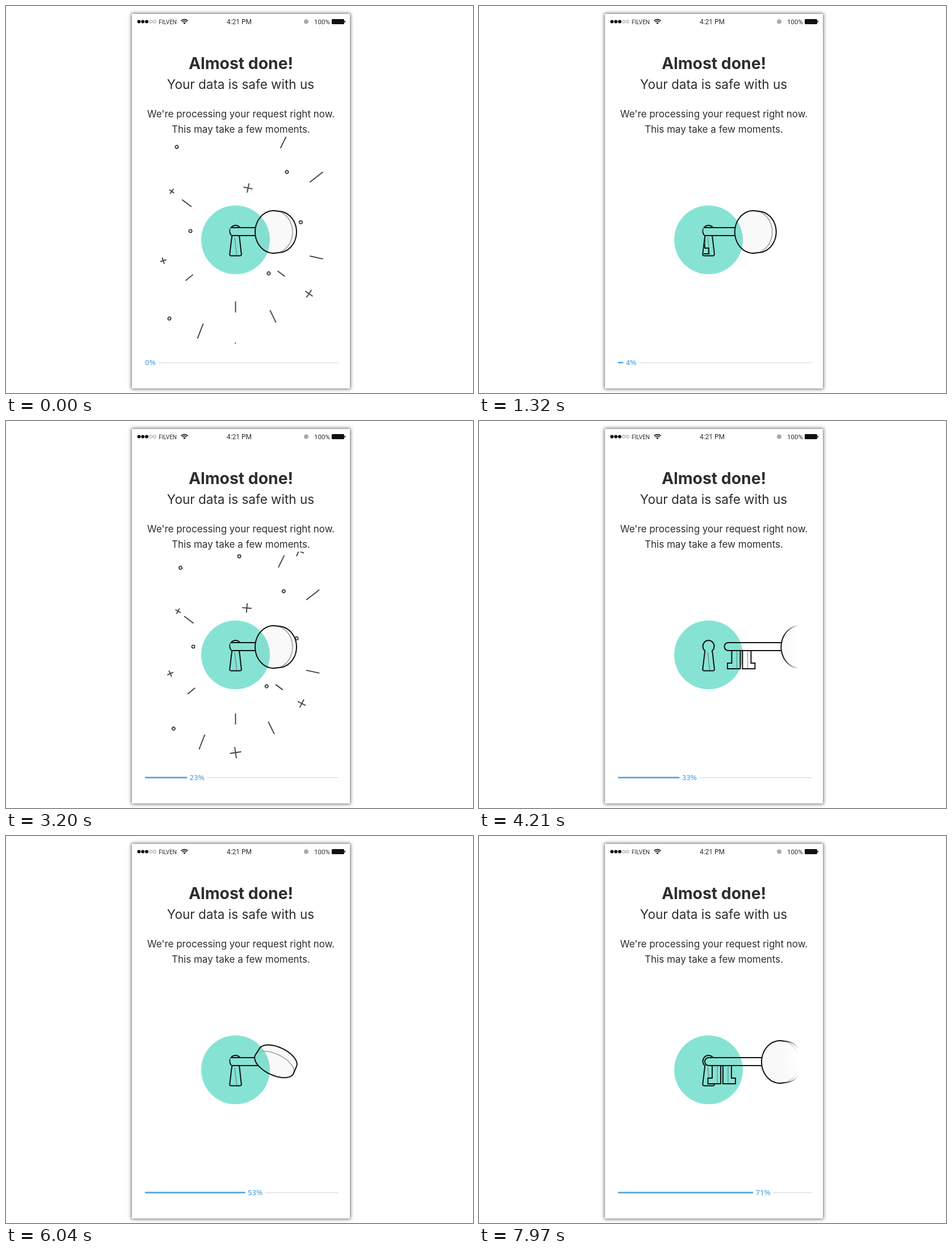
Animation, 823 px wide and 681 px high, one loop 8 s. Source, as an HTML page with a canvas:

```html
<!DOCTYPE html>
<html lang="en">
<head>
<meta charset="utf-8">
<title>Almost done</title>
<style>
  html, body { margin: 0; width: 823px; height: 681px; overflow: hidden; background: #fff; }
  .card { position: absolute; left: 222px; top: 14px; width: 384px; height: 659px; background: #fff; box-shadow: 0 0 6px 1px rgba(0, 0, 0, .6); }
  svg, canvas { position: absolute; left: 0; top: 0; }
  text { font-family: Inter, sans-serif; fill: #2d2d2d; }
  .mid { text-anchor: middle; }
  .status { font-family: Roboto, sans-serif; }
  #percent { font: 600 13px "Open Sans", sans-serif; fill: #62aee0; }
</style>
</head>
<body>
<div class="card"></div>
<svg width="823" height="681">
  <g fill="#111">
    <circle cx="234.3" cy="27.5" r="3"/><circle cx="241.1" cy="27.5" r="3"/><circle cx="247.9" cy="27.5" r="3"/>
    <g fill="none" stroke="#777" stroke-width=".8"><circle cx="254.9" cy="27.5" r="2.6"/><circle cx="261.7" cy="27.5" r="2.6"/></g>
    <path d="M314.5 32 l-2.2 -2.2 a3.1 3.1 0 0 1 4.4 0z"/>
    <path d="M310.6 28.1 a5.5 5.5 0 0 1 7.8 0 M308.6 26.1 a8.4 8.4 0 0 1 11.8 0" fill="none" stroke="#111" stroke-width="1.7"/>
    <rect x="574" y="23" width="22" height="9" rx="1.5"/><rect x="596.5" y="26" width="1.5" height="3"/>
  </g>
  <circle cx="529" cy="27.5" r="4" fill="#aaa"/>
  <text class="status" x="269" y="31.5" font-size="10">FILVEN</text>
  <text class="status mid" x="411" y="32" font-size="12">4:21 PM</text>
  <text class="status" x="543" y="32" font-size="11.5">100%</text>
  <text class="mid" x="414" y="111" font-size="28.3" font-weight="700">Almost done!</text>
  <text class="mid" x="413.5" y="146" font-size="22.5">Your data is safe with us</text>
  <text class="mid" x="414" y="196" font-size="17">We're processing your request right now.</text>
  <text class="mid" x="414" y="223" font-size="17">This may take a few moments.</text>
  <rect id="track" y="627" height="1.3" fill="#dadcde"/>
  <rect id="bar" x="245" y="626" height="3" fill="#62aee0"/>
  <text id="percent" y="632"></text>
</svg>
<canvas id="stage" width="823" height="681"></canvas>
<script>
const ctx = document.getElementById('stage').getContext('2d');
const track = document.getElementById('track');
const bar = document.getElementById('bar');
const percent = document.getElementById('percent');

const LOOP = 8000, CYCLE = 3567, BURST_AT = 2643;
const CX = 404.5, CY = 411.5;
const TEAL = '#86e3d3', INK = '#111';

// time, percent
const progress = [[0, 0], [850, 0], [1320, 4.5], [3200, 23.4], [4970, 41.4], [6040, 53.3], [7170, 63.4], [8000, 71.6]];

// Burst parts: x and y from the centre, then half size
const circles = [[-103.5, -163.5], [90.5, -119.5], [115, -31], [58.5, 59], [-116.5, 138.5], [-79.5, -15.5], [7, -185]];
const lines = [[84.4, -172, 12], [142.5, -110.5, 14.6], [-86, -64.5, 10.4], [-81.5, 66.5, 8.5], [0, 118, 9.7],
  [80.5, 59.5, 8], [66, 134.5, 12], [-62, 160.5, 14], [142.5, 31, 12]];
const pluses = [[22, -91, 8.3], [-112, -85, 5.3], [129, 94.5, 8], [-127, 36.5, 5.8], [0, 190, 10], [123, -202, 10]];

const clamp = v => Math.max(0, Math.min(1, v));

function interpolate(points, t) {
  const i = Math.max(1, points.findIndex(p => p[0] > t));
  const [t0, v0] = points[i - 1], [t1, v1] = points[i];
  return v0 + (v1 - v0) * (t - t0) / (t1 - t0);
}

const keyhole = new Path2D('M398.3 404.5 A10 10.3 0 1 1 410.7 404.5 Q411.5 407 411.7 409 L414.8 436.5 Q415 439.5 412.5 439.5 H396.5 Q394 439.5 394.3 436.5 L397.6 409 Q398 407 398.3 404.5Z');
// The key is hidden once it passes the left wall of the keyhole
const keyArea = new Path2D('M396 383 L395.5 397 L398.8 405 L395.5 438 H600 V350 H396Z');

function strokePath(path, color, width = 2) {
  ctx.strokeStyle = color;
  ctx.lineWidth = width;
  ctx.stroke(path);
}

function drawDisc() {
  ctx.fillStyle = TEAL;
  ctx.beginPath();
  ctx.arc(CX, CY, 60.5, 0, 7);
  ctx.fill();
}

function drawBurst(age, alpha) {
  const decay = Math.exp(-.0037 * age);
  const grow = clamp(age / 250);
  const place = ([x, y], reach, travel, spin, draw) => {
    const k = reach - travel * decay;
    ctx.save();
    ctx.translate(CX + x * k, CY + y * k);
    ctx.rotate(Math.atan2(y, x) + spin);
    ctx.scale(grow, grow);
    ctx.beginPath();
    draw();
    ctx.stroke();
    ctx.restore();
  };
  ctx.save();
  ctx.beginPath();
  ctx.rect(222, 230, 384, 364);
  ctx.clip();
  ctx.globalAlpha = alpha;
  ctx.strokeStyle = '#444';
  ctx.lineWidth = 1.9;
  for (const c of circles) place(c, 1.022, .67, 0, () => ctx.arc(0, 0, 2.6, 0, 7));
  for (const l of lines) place(l, 1.0155, .47, 0, () => { ctx.moveTo(-l[2], 0); ctx.lineTo(l[2], 0); });
  for (const p of pluses) place(p, 1.037, 1.037, -1.2 * decay, () => {
    ctx.moveTo(-p[2], 0); ctx.lineTo(p[2], 0);
    ctx.moveTo(0, -p[2]); ctx.lineTo(0, p[2]);
  });
  ctx.restore();
}

// Key head: a thick round plate turned about the shaft by an angle; its back face is a little smaller
function headPaths(x, angle) {
  const s = Math.sin(angle), c = Math.cos(angle);
  const a = [33 + 2 * s, 14 * s], b = [0, 37.5 * c], depth = [8 - 2 * s, -14 * s];
  const cross = (u, v) => u[0] * v[1] - u[1] * v[0];
  const start = Math.atan2(cross(b, depth), cross(a, depth));
  const arc = (path, from, side, scale = 1) => {
    for (let i = 0; i <= 40; i++) {
      const f = from + Math.PI * i / 40;
      path.lineTo(x + scale * (a[0] * Math.cos(f) + b[0] * Math.sin(f)) + side * depth[0],
        397.6 - 1.8 * s + scale * (a[1] * Math.cos(f) + b[1] * Math.sin(f)) + side * depth[1]);
    }
  };
  const hull = new Path2D(), edge = new Path2D();
  arc(hull, start, .5, .97);
  arc(hull, start + Math.PI, -.5);
  hull.closePath();
  arc(edge, start, -.5);
  return { hull, edge };
}

function fadeRight(r, g, b, a = 1) {
  const gradient = ctx.createLinearGradient(535, 0, 563, 0);
  gradient.addColorStop(0, `rgba(${r},${g},${b},${a})`);
  gradient.addColorStop(1, `rgba(${r},${g},${b},0)`);
  return gradient;
}

function drawKey(offset, angle, alpha) {
  const { hull, edge } = headPaths(476 + offset, angle);
  const at = x => x + offset;
  const shaft = new Path2D(`M${at(470)} 390 H${at(346)} a7 7 0 0 0 0 14 H${at(470)}`);
  const bits = new Path2D(`M${at(352)} 404 V426 H${at(344.5)} V436 H${at(367)} V404 M${at(371)} 404 V436 H${at(393)} V426 H${at(386)} V404`);
  const shade = new Path2D(`M${at(361)} 405 V435 M${at(380)} 405 V435`);
  const body = new Path2D(shaft);
  body.addPath(bits);
  const outsideHead = new Path2D(hull);
  outsideHead.rect(0, 0, 823, 681);

  ctx.save();
  ctx.globalAlpha = alpha;
  ctx.save();
  ctx.clip(keyArea);
  ctx.clip(outsideHead, 'evenodd');
  ctx.save();
  ctx.clip(body);
  ctx.fillStyle = '#fff';
  ctx.fillRect(380, 350, Math.max(0, Math.min(180, at(475) - 380)), 100);
  drawDisc();
  ctx.restore();
  strokePath(shade, 'rgba(70,110,105,.6)', 1.5);
  strokePath(bits, fadeRight(17, 17, 17));
  strokePath(shaft, fadeRight(17, 17, 17));
  ctx.restore();
  ctx.fillStyle = fadeRight(90, 90, 90, .035);
  ctx.fill(hull);
  strokePath(edge, fadeRight(165, 172, 170), 1.8);
  strokePath(hull, fadeRight(17, 17, 17));
  ctx.restore();
}

function drawProgress(t) {
  const value = Math.floor(interpolate(progress, t));
  const x = 245 + 3.417 * value;
  percent.textContent = value + '%';
  percent.setAttribute('x', x);
  bar.setAttribute('width', Math.max(0, x - 249.5));
  const trackX = x + percent.getComputedTextLength() + 4.5;
  track.setAttribute('x', trackX);
  track.setAttribute('width', 586 - trackX);
}

function frame(now) {
  const t = now % LOOP, phase = t % CYCLE;
  const ending = phase < 440;
  const alpha = ending ? clamp((440 - phase) / 100) : 1;
  const offset = ending ? 0 : 60 * Math.max(0, (2000 - phase) / 1170) ** 3;
  const angle = Math.PI / 3 * Math.sin(Math.PI * clamp((phase - 1980) / 880)) ** 2;

  ctx.clearRect(0, 0, 823, 681);
  if (ending || phase > BURST_AT) drawBurst((phase - BURST_AT + CYCLE) % CYCLE, alpha);
  drawDisc();
  strokePath(new Path2D('M403 407 L406.5 438'), 'rgba(70,110,105,.6)', 1.5);
  strokePath(keyhole, INK);
  drawKey(offset, angle, alpha);
  drawProgress(t);
  requestAnimationFrame(() => frame(performance.now() - startTime));
}

const startTime = performance.now();
frame(0);
</script>
</body>
</html>
```
